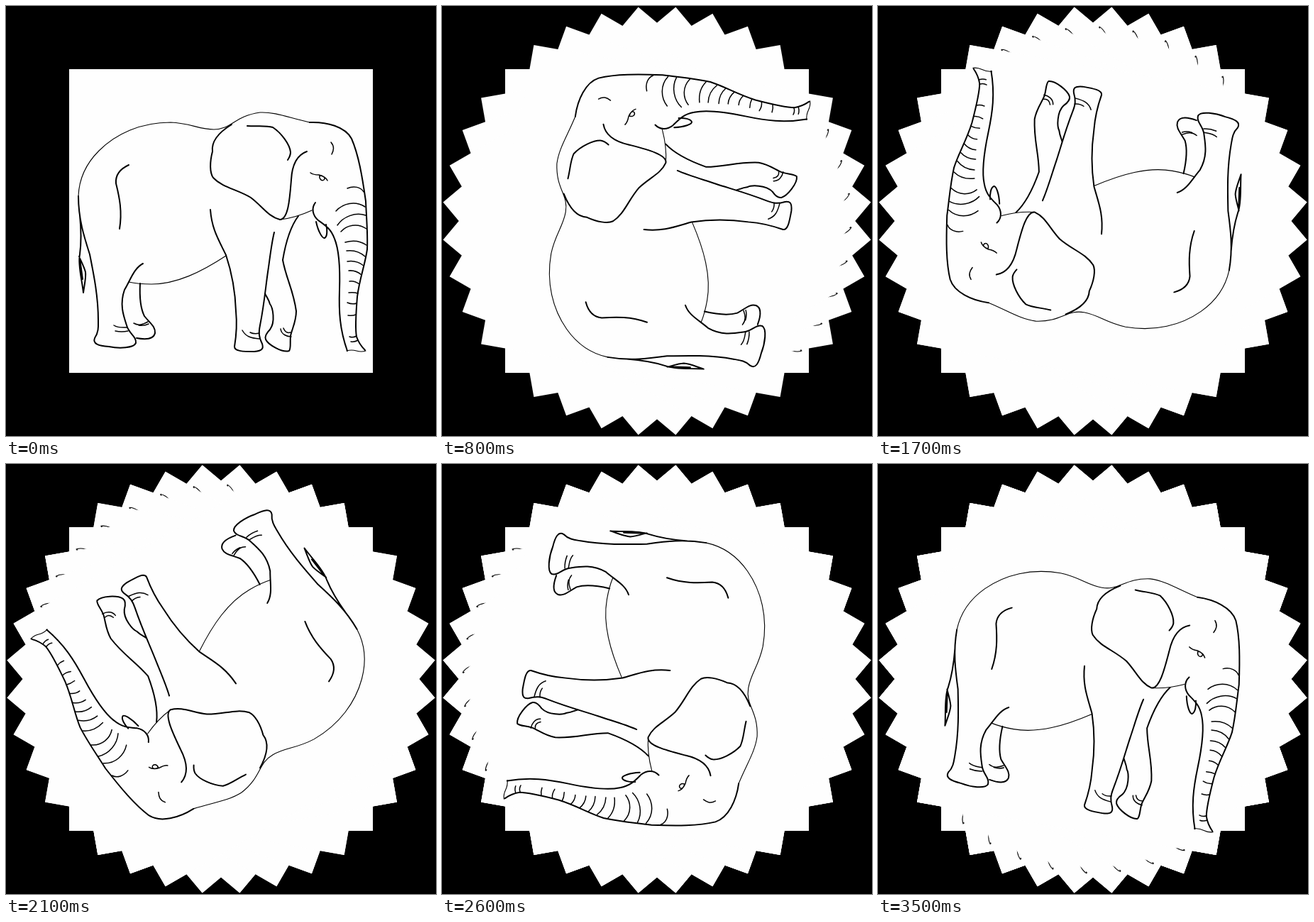
Write an HTML page with a canvas that moves like this. It is 606x606 px and loops after 3600 ms.

```html
<!DOCTYPE html>
<html lang="en">
<head>
<meta charset="utf-8">
<title>Turning elephant</title>
<style>
  html, body { margin: 0; width: 100%; height: 100%; overflow: hidden; background: #000; }
  canvas { display: block; }
</style>
</head>
<body>
<canvas id="stage" width="606" height="606"></canvas>
<script>
const ctx = document.getElementById('stage').getContext('2d');
const CENTER = 303, HALF = 214, STEPS = 36, STEP_MS = 100;

const thin = {
  back: 'M102 268C103 240 115 220 131 204C155 180 190 164 232 164C260 165 272 174 293 174C318 174 322 155 358 150C380 149 400 158 428 164',
  belly: 'M310 352C275 375 240 392 205 392C193 392 182 391 173 389',
  cheek: 'M386 301C405 299 418 294 431 288',
  trunkTip: 'M480 486Q487 484 494 486T507 486'
};

const bold = {
  trunkFront: 'M428 164C452 163 478 170 487 187C497 210 502 240 507 275C508 300 510 320 509 343C506 365 498 385 495 410C493 435 492 455 494 466C497 475 502 481 506 485',
  trunkBack: 'M481 486C470 455 469 430 470 400C471 370 470 345 463 328C458 314 450 309 440 302C432 295 430 285 436 277',
  tusk: 'M437 304C440 318 446 328 449 327C453 325 453 315 451 308',
  ear: 'M318 167C300 178 289 190 291 205C287 220 287 235 292 242C305 256 325 258 345 270C362 283 370 297 386 301C398 301 400 270 402 245C403 225 410 210 424 205',
  earFold: 'M340 169C355 170 365 168 376 171C388 179 400 195 401 206C401 210 399 214 397 217',
  flank: 'M173 224C160 230 154 238 155 250C160 270 164 290 160 314',
  frontLeg: 'M288 287C290 315 300 330 310 351C318 375 323 400 324 430C326 450 324 468 322 480C322 487 335 487 350 487C362 486 363 482 361 476C356 466 356 460 358 450C364 420 366 395 369 375C372 355 374 335 378 319',
  frontFarLeg: 'M412 296C400 312 393 340 390 358C395 385 405 400 409 430C409 445 403 455 401 465C400 475 402 482 399 486C390 489 370 478 366 470C364 465 368 460 372 456C380 445 376 425 372 420C370 413 367 410 365 405',
  hindLeg: 'M193 363C180 370 176 385 167 400C160 420 165 435 170 450C173 462 184 465 183 475C180 482 160 483 145 480C130 479 122 476 125 468C131 460 130 450 130 443C130 410 124 380 118 350C110 325 102 300 102 268',
  hindFarLeg: 'M189 391C188 410 189 425 195 437C203 447 211 452 210 461C208 470 195 470 184 468',
  tail: 'M104 295C106 315 106 335 104 350C101 365 107 385 109 404C111 390 113 382 112 375C110 367 105 358 103 353M104 356L108 385'
};

const medium = {
  eye: 'M429 235Q433 238 441 238Q450 240 453 246M442 239C441 244 445 247 448 245C451 242 447 239 442 239',
  brow: 'M458 192C463 198 462 203 459 209',
  hindToes: 'M152 450C158 454 164 453 171 453M154 458Q163 460 172 458M180 447C187 451 193 449 200 445M187 450Q195 451 201 448',
  frontToes: 'M333 457C338 466 345 468 357 469M344 460Q350 463 357 461M387 455C388 463 396 466 402 466M391 454Q394 462 401 460',
  upperFolds: 'M481 257C490 253 500 255 504 262M465 289C475 278 492 274 506 283M467 309C475 297 492 290 507 295M472 318C480 309 495 305 508 314',
  midFolds: 'M478 333Q495 328 508 337M480 345Q495 343 506 353M481 360Q494 358 504 366M483 373Q493 372 501 379',
  lowFolds: 'M484 388Q491 387 498 392M483 404Q490 403 496 405M481 418Q488 421 494 419M482 436Q488 437 493 435M484 466Q489 468 494 465M486 473Q491 474 496 471'
};

const strokes = [[1.1, thin], [1.5, medium], [2, bold]].map(([width, parts]) =>
  [width, new Path2D(Object.values(parts).join(''))]);

function drawCard(step) {
  ctx.save();
  ctx.translate(CENTER, CENTER);
  ctx.rotate(-step * 2 * Math.PI / STEPS);
  ctx.translate(-CENTER, -CENTER);
  ctx.fillStyle = '#fefefe';
  ctx.fillRect(CENTER - HALF, CENTER - HALF, 2 * HALF, 2 * HALF);
  ctx.strokeStyle = '#000';
  ctx.lineCap = ctx.lineJoin = 'round';
  for (const [width, path] of strokes) {
    ctx.lineWidth = width;
    ctx.stroke(path);
  }
  ctx.restore();
}

// Earlier cards stay visible beneath the newest one.
function drawStack(top) {
  ctx.fillStyle = '#000';
  ctx.fillRect(0, 0, 606, 606);
  for (let step = 0; step <= top; step++) drawCard(step);
}

const start = performance.now();
let shown = -1;

function tick() {
  const step = Math.floor((performance.now() - start) / STEP_MS) % STEPS;
  if (step !== shown) drawStack(shown = step);
  requestAnimationFrame(tick);
}
tick();
</script>
</body>
</html>
```
